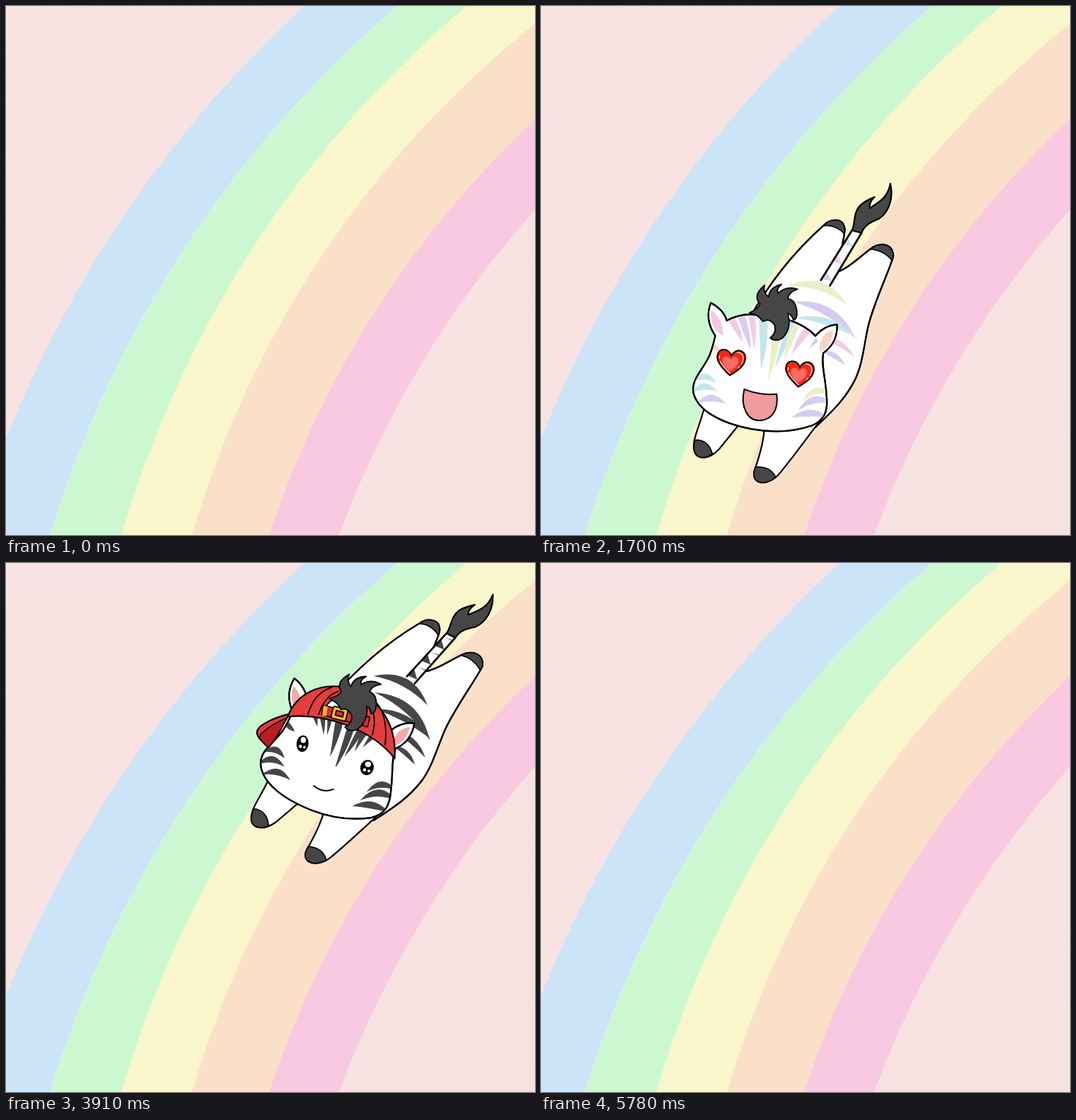
An HTML page with a canvas that plays this animation: 748 by 748 pixels, repeating every 5.95 s.

```html
<!DOCTYPE html>
<html lang="en">
<head>
<meta charset="utf-8">
<title>Rainbow slide</title>
<style>
html, body { margin: 0; width: 100%; height: 100%; overflow: hidden; background: #f7e2e1; }
canvas { display: block; width: 100vw; height: 100vh; }
</style>
</head>
<body>
<canvas id="stage" width="748" height="748"></canvas>
<script>
const ctx = document.getElementById('stage').getContext('2d');
const SIZE = 748, STEP = 170, STEPS = 35, RAD = Math.PI / 180;
const DARK = '#464646', INK = '#000';
const PINK = '#f1cde6', LILAC = '#d5ccf1', TEAL = '#c2e7ec', LIME = '#ebefc9', PEACH = '#f7d3c4';

// Rainbow edges: start, end, bulge, colour of the band that follows
const bands = [
  [422, 0, 0, 612, 42, '#cbe4f8'],
  [553, 0, 62, 748, 63.5, '#ccf8d1'],
  [651, 0, 163, 748, 66, '#faf6cb'],
  [748, 25, 263, 748, 67.5, '#fae0c9'],
  [748, 160, 372, 748, 44, '#f9c9e1'],
  [748, 288, 471, 748, 25, '#f6e2e0']
];

const P = d => new Path2D(d);
const shape = {
  body: P('M380 300C415 248 455 208 497 177C508 168 526 167 527 184C526 198 516 215 514 243C530 238 545 225 560 216C572 208 592 208 592 228C589 240 562 285 549 320C540 345 536 375 522 398C505 425 485 440 460 460L390 430Z'),
  hindHoofs: P('M497 177C506 168 526 166 527 184L526 191Q514 176 497 177ZM560 216C572 208 592 208 592 228L590 235Q578 218 560 216Z'),
  arms: P('M308 413C302 432 292 450 288 463C284 478 287 488 301 488C308 488 314 485 322 478L356 443ZM389 452C386 470 382 482 372 506C364 520 367 531 382 531C390 530 395 528 402 522C428 496 450 470 474 444Z'),
  frontHoofs: P('M289 462C284 478 287 488 301 488Q307 487 312 484Q308 463 289 462ZM371 508C364 520 367 531 382 531Q391 530 398 525Q392 508 371 508Z'),
  tail: P('M487 253L537 187L550 192L499 262Z'),
  tailLines: P('M487 253L537 187M550 192L499 262'),
  brush: P('M537 187C543 178 540 162 553 152Q560 147 573 143Q564 150 565 158C580 150 592 145 597 126C600 148 591 166 577 174C563 178 555 182 550 192Z'),
  head: P('M331 318C321 300 322 285 329 271C339 277 347 287 349 298C364 292 380 291 392 294C420 297 455 308 472 331C480 323 492 317 504 318C503 333 497 347 481 356C476 372 481 392 480 415C481 440 473 451 455 457C425 464 395 461 370 454C325 441 297 420 293 396C291 378 306 367 318 349Q324 340 331 318Z'),
  earL: P('M329 282C325 297 329 312 342 319C344 305 339 290 329 282Z'),
  earR: P('M498 324C484 327 474 340 477 354C489 348 496 339 498 324Z'),
  mane: P('M382 290Q396 285 398 279Q388 266 407 253Q403 263 411 270Q414 256 431 254Q422 260 425 266Q438 256 453 263Q440 266 438 275Q449 278 449 294Q449 305 443 306Q441 297 436 296Q440 318 425 330Q415 335 408 328Q418 322 416 311Q410 299 400 304Q395 294 382 290Z'),
  heart: P('M-1 19C-10 11 -20 2 -20 -7C-20 -19 -5 -21 0 -9C6 -21 20 -18 20 -6C19 6 9 12 -1 19Z'),
  laugh: P('M365 397Q386 408 410 408C411 428 402 443 384 443C365 443 357 420 365 397Z'),
  smile: P('M320 511Q334 520 348 512'),
  crown: P('M270 419C278 385 308 366 342 367C390 370 424 405 428 457C395 425 330 405 270 419Z'),
  brim: P('M272 415C252 423 230 436 230 446C230 455 243 461 249 466C257 455 262 437 272 415Z'),
  brimIn: P('M269 421C252 431 237 444 234 453Q240 461 249 466C257 455 263 440 269 421Z'),
  seams: P('M298 412C301 390 312 376 327 369M313 410C316 393 323 380 336 374M412 440C411 410 402 388 386 378M392 428C395 408 390 393 380 386'),
  gap: P('M322 398C325 385 340 382 350 385C360 386 364 395 363 408Z'),
  strap: P('M318 396L385 404L384 418L317 410Z')
};

// Each stripe: x1, y1, x2, y2, bend, thickness, colour
const bodyStripes = [
  [440, 257, 520, 291, -13, 12, LIME],
  [444, 280, 528, 340, -13, 12, LILAC],
  [446, 303, 528, 337, -8, 9, TEAL],
  [472, 330, 524, 365, -6, 8, PINK],
  [476, 352, 510, 376, -4, 7, LILAC]
];
const browStripes = [
  [340, 270, 369, 331, -3, 10, PINK],
  [357, 255, 379, 342, -3, 10, LILAC],
  [378, 250, 384, 342, -4, 9, PINK],
  [398, 235, 391, 372, -6, 12, TEAL],
  [425, 270, 399, 389, -4, 10, LIME],
  [449, 275, 411, 370, -3, 9, TEAL],
  [464, 285, 425, 361, 3, 9, LIME],
  [490, 298, 436, 354, 4, 10, PINK],
  [498, 323, 463, 347, 3, 7, LILAC],
  [322, 324, 338, 341, 2, 7, PEACH]
];
const cheekStripes = [
  [295, 379, 326, 385, -8, 9, TEAL],
  [289, 397, 327, 397, -9, 9, TEAL],
  [296, 411, 337, 415, -8, 9, LILAC],
  [489, 416, 446, 421, 10, 9, LIME],
  [490, 430, 438, 434, 11, 10, LILAC],
  [480, 447, 428, 443, 6, 10, LILAC]
];

function paint(path, fill, line = 2.2) {
  if (fill) { ctx.fillStyle = fill; ctx.fill(path); }
  if (line) { ctx.lineWidth = line; ctx.strokeStyle = INK; ctx.stroke(path); }
}

function oval(x, y, rx, ry, fill, turn = 0) {
  ctx.beginPath();
  ctx.ellipse(x, y, rx, ry, turn, 0, 7);
  ctx.fillStyle = fill;
  ctx.fill();
}

function group(draw) {
  ctx.save();
  draw();
  ctx.restore();
}

function stripes(list, plain) {
  for (const [x1, y1, x2, y2, bend, thick, color] of list) {
    const dx = x2 - x1, dy = y2 - y1, len = Math.hypot(dx, dy);
    const mx = (x1 + x2) / 2, my = (y1 + y2) / 2;
    const side = k => [mx - dy / len * k, my + dx / len * k];
    ctx.beginPath();
    ctx.moveTo(x1, y1);
    ctx.quadraticCurveTo(...side(2 * bend - thick), x2, y2);
    ctx.quadraticCurveTo(...side(2 * bend + thick), x1, y1);
    ctx.fillStyle = plain ? DARK : color;
    ctx.fill();
  }
}

function drawSky() {
  const g = ctx.createLinearGradient(0, 0, SIZE, SIZE);
  g.addColorStop(0, '#f8e2e2');
  g.addColorStop(1, '#f6e3e0');
  ctx.fillStyle = g;
  ctx.fillRect(0, 0, SIZE, SIZE);
  bands.forEach(([x1, y1, x2, y2, bulge, color], i) => {
    const dx = x2 - x1, dy = y2 - y1, k = 2 * bulge / Math.hypot(dx, dy);
    const curve = () => {
      ctx.beginPath();
      ctx.moveTo(x1, y1);
      ctx.quadraticCurveTo((x1 + x2) / 2 - dy * k, (y1 + y2) / 2 + dx * k, x2, y2);
    };
    curve();
    ctx.lineTo(x2, SIZE);
    ctx.lineTo(SIZE, SIZE);
    ctx.lineTo(SIZE, 0);
    ctx.fillStyle = i === 5 ? g : color;
    ctx.fill();
    if (i === 1) {
      curve();
      ctx.strokeStyle = '#f1e8e4';
      ctx.lineWidth = 1;
      ctx.stroke();
    }
  });
}

function drawTail(plain) {
  paint(shape.tail, '#fff', 0);
  group(() => {
    ctx.clip(shape.tail);
    const tints = [LILAC, TEAL, PINK];
    for (let i = 0; i < 6; i++) {
      const x = 497 + i * 8.5, y = 253 - i * 11.4, s = i % 2 ? 1 : -1;
      ctx.beginPath();
      ctx.moveTo(x - 5 * s, y - 3 * s);
      ctx.lineTo(x + 8 * s, y + 1 * s);
      ctx.lineTo(x + 5 * s + 4, y + 6 * s - 6);
      ctx.fillStyle = plain ? DARK : tints[i % 3];
      ctx.fill();
    }
  });
  paint(shape.tailLines, null, 2.8);
  paint(shape.brush, DARK);
}

// Moves along the zebra's own long axis, towards the nose
function shift(d) {
  ctx.translate(-0.255 * d, 0.967 * d);
}

function drawBody(plain, slide) {
  paint(shape.body, '#fff');
  group(() => {
    ctx.clip(shape.body);
    stripes(bodyStripes, plain);
  });
  paint(shape.body, null);
  paint(shape.hindHoofs, DARK, 1.6);
  drawTail(plain);
  group(() => {
    shift(-0.5 * slide);
    paint(shape.arms, '#fff');
    paint(shape.frontHoofs, DARK, 1.6);
  });
}

function drawHeart() {
  ctx.rotate(8 * RAD);
  paint(shape.heart, '#fc260c', 2);
  group(() => {
    ctx.scale(0.84, 0.84);
    ctx.strokeStyle = '#fff';
    ctx.lineWidth = 1.2;
    ctx.setLineDash([26, 5, 4, 40]);
    ctx.stroke(shape.heart);
  });
  ctx.translate(-1, 2);
  ctx.scale(0.58, 0.58);
  paint(shape.heart, '#ff6b68', 0);
}

function drawEye() {
  oval(0, 0, 9, 11.5, INK, 0.1);
  oval(1, -5, 4, 4.2, '#fff');
  oval(-3, 4, 2.2, 2.4, '#fff');
  oval(3, 5, 1.8, 2, '#fff');
}

// Both eyes bend with the slide: the left grows narrow, the right wide
function drawEyes(draw, x1, y1, x2, y2, slide) {
  const k = slide / 17;
  group(() => {
    ctx.translate(x1, y1);
    ctx.rotate(-20 * k * RAD);
    ctx.scale(1 - 0.2 * k, 1 + 0.06 * k);
    draw();
  });
  group(() => {
    ctx.translate(x2, y2);
    ctx.rotate(-8 * k * RAD);
    ctx.scale(1 + 0.18 * k, 1 - 0.22 * k);
    draw();
  });
}

function drawCap() {
  paint(shape.brim, '#e33a3a');
  paint(shape.brimIn, '#b81d1f', 1.6);
  paint(shape.crown, '#e43d3e');
  paint(shape.seams, null, 1.8);
  paint(shape.gap, '#fff', 1.6);
  group(() => {
    ctx.clip(shape.crown);
    paint(shape.strap, '#d92f31', 1.6);
    ctx.fillStyle = '#eeb52c';
    ctx.fillRect(318, 397, 6, 14);
  });
  group(() => {
    ctx.translate(342, 405);
    ctx.rotate(6 * RAD);
    ctx.lineWidth = 7;
    ctx.strokeStyle = INK;
    ctx.strokeRect(-8, -6, 16, 12);
    ctx.lineWidth = 3.6;
    ctx.strokeStyle = '#f4bb2f';
    ctx.strokeRect(-8, -6, 16, 12);
  });
}

function drawHead(plain, slide) {
  paint(shape.head, '#fff');
  paint(shape.earL, plain ? '#f5a9aa' : '#f4c9e0', 0);
  paint(shape.earR, plain ? '#f5a9aa' : PEACH, 0);
  group(() => {
    ctx.clip(shape.head);
    stripes(cheekStripes, plain);
    ctx.beginPath();
    ctx.moveTo(300, 375);
    ctx.lineTo(331, 318);
    ctx.quadraticCurveTo(340, 304, 349, 298);
    ctx.bezierCurveTo(390, 284, 450, 305, 472, 331);
    ctx.lineTo(481, 356);
    ctx.lineTo(475, 400);
    ctx.clip();
    shift(slide);
    stripes(browStripes, plain);
  });
  paint(shape.head, null);
  shift(slide);
  if (plain) {
    group(() => {
      ctx.translate(397.5, 369.5);
      ctx.rotate(2.4 * RAD);
      ctx.translate(-343.5, -464.5);
      drawEyes(drawEye, 296, 454, 391, 475, slide);
      paint(shape.smile, null, 2);
      drawCap();
    });
  } else {
    drawEyes(drawHeart, 350, 357, 445, 382, slide);
    paint(shape.laugh, '#f09a9d', 2);
  }
  paint(shape.mane, DARK, 1.8);
}

// The rider follows a big arc: angle on the arc, own turn in degrees
function drawZebra(plain, arc, turn) {
  const slide = Math.min(20, Math.max(0, 1.1 * (arc - 32.33)));
  const r = 1609 + 0.15 * slide;
  group(() => {
    ctx.translate(1757 - r * Math.cos(arc * RAD), 1230 - r * Math.sin(arc * RAD));
    ctx.rotate((turn - 14.8) * RAD);
    ctx.translate(-397.5, -369.5);
    drawBody(plain, slide);
    drawHead(plain, slide);
  });
}

function render(step) {
  drawSky();
  if (step > 0 && step < 17) {
    const k = step - 8;
    drawZebra(false, 32.33 - 2.905 * k, 14.8 - 2.738 * k + 0.0717 * k * k);
  } else if (step >= 17 && step < 34) {
    const k = step - 26;
    drawZebra(true, 28.44 - 2.757 * k, 12.4 - 2.63 * k);
  }
}

ctx.lineJoin = ctx.lineCap = 'round';
const begin = performance.now();
let shown = -1;
function tick() {
  const step = Math.floor((performance.now() - begin) / STEP) % STEPS;
  if (step !== shown) render(shown = step);
  requestAnimationFrame(tick);
}
tick();
</script>
</body>
</html>
```
